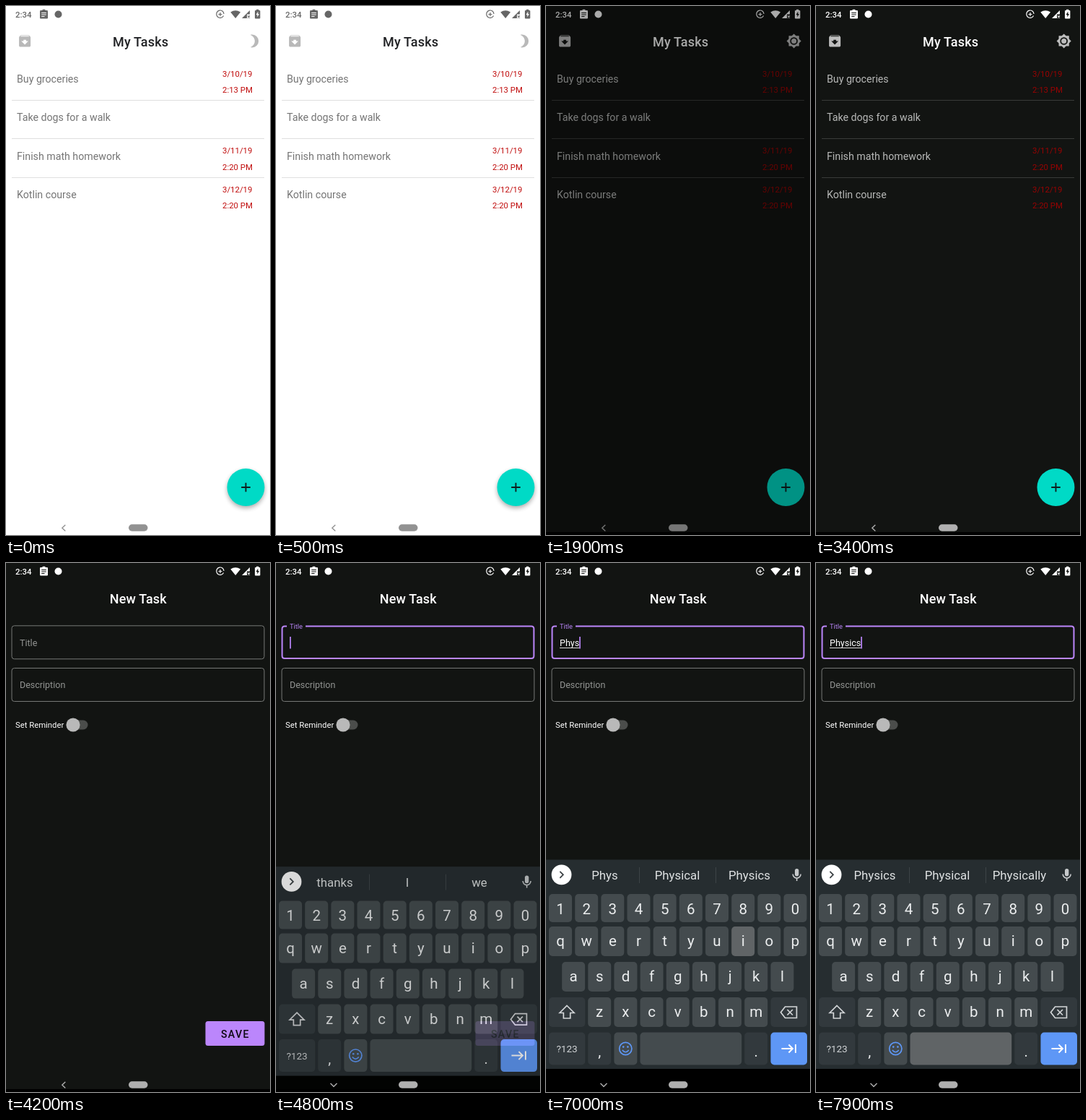
An HTML page that plays this animation: 366 px wide and 732 px high, repeating every 8000 ms.

```html
<!DOCTYPE html>
<html lang="en">
<head>
<meta charset="utf-8">
<title>My Tasks</title>
<style>
html, body { margin: 0; width: 100%; height: 100%; overflow: hidden; background: #000; }
svg { display: block; width: 366px; height: 732px; font-family: Roboto, "Noto Sans", sans-serif; }
.light { --bg: #fff; --bar: #666; --title: #202124; --icon: #b9b9b9; --text: #757575; --date: #c00c0c; --line: #dfdfdf; --nav: #929292; --edge: #fff; }
.dark { --bg: #121412; --bar: #fff; --title: #fff; --icon: #bdbdbd; --text: #b8b9b8; --date: #980303; --line: #393b39; --nav: #b0b0b0; --edge: #000; }
.bg { fill: var(--bg); }
.bar { fill: var(--bar); }
.bar-line { fill: none; stroke: var(--bar); stroke-width: 1.2; }
.bg-line { fill: none; stroke: var(--bg); stroke-width: 1.2; }
.icon { fill: var(--icon); }
.title { fill: var(--title); font-size: 18px; font-weight: 500; letter-spacing: .2px; text-anchor: middle; }
.task { fill: var(--text); font-size: 14.2px; }
.date { fill: var(--date); font-size: 11.4px; }
.rule { stroke: var(--line); }
.light .sun, .dark .moon, .dark .shadow { display: none; }
.hint { fill: #929492; font-size: 12.5px; }
.key { fill: #444b4e; }
.key.fn { fill: #32393d; }
.key.enter { fill: #5e97f6; }
.key.down { fill: #606466; }
.cap { fill: #eceeef; font-size: 20.5px; text-anchor: middle; }
.word { fill: #dfe2e3; font-size: 16.8px; text-anchor: middle; }
.stroke { fill: none; stroke: #d3d6d8; stroke-width: 1.7; }
</style>
</head>
<body>
<svg id="stage" class="light" viewBox="0 0 366 732"></svg>
<script>
const LOOP = 8000, STEP = 100;
const stage = document.getElementById('stage');

const text = (x, y, s, cls, extra = '') => `<text x="${x}" y="${y}" class="${cls}" ${extra}>${s}</text>`;
const rect = (x, y, w, h, r, extra) => `<rect x="${x}" y="${y}" width="${w}" height="${h}" rx="${r}" ${extra}/>`;
const path = (d, extra) => `<path d="${d}" ${extra}/>`;
const circle = (x, y, r, extra) => `<circle cx="${x}" cy="${y}" r="${r}" ${extra}/>`;

function statusBar() {
  return text(13, 16, '2:34', 'bar', 'font-size="11.4" font-weight="500"') +
    rect(47, 6, 11, 11.5, 1.2, 'class="bar"') +
    rect(50.3, 4.8, 4.4, 3, 1.2, 'class="bar"') +
    path('M49.2 9.5H55.8M49.2 12H55.8M49.2 14.5H53.5', 'class="bg-line"') +
    circle(72.5, 11.5, 5, 'class="bar"') +
    path('M300 7A5.2 5.2 0 1 0 301.6 13.6M300 7A5.2 5.2 0 0 1 302 11', 'class="bar-line"') +
    path('M297 9V14M294.5 11.5H299.5', 'class="bar-line"') +
    path('M318.2 17L311.3 8.4Q318.2 3.9 325.1 8.4Z', 'class="bar"') +
    path('M338 6V11.5H334V17H327Z', 'class="bar"') +
    path('M335 13.5L338 16.5M338 13.5L335 16.5', 'class="bar-line"') +
    rect(345, 6, 7.4, 11.4, 1, 'class="bar"') +
    rect(347, 4.8, 3.4, 2, .3, 'class="bar"') +
    path('M349.4 7.6L346.6 12.2H348.4V15.6L351 10.9H349.4Z', 'class="bg"');
}

function listPage() {
  const tasks = [
    ['Buy groceries', '3/10/19', '2:13 PM'],
    ['Take dogs for a walk'],
    ['Finish math homework', '3/11/19', '2:20 PM'],
    ['Kotlin course', '3/12/19', '2:20 PM']
  ];
  const rows = tasks.map(([name, day, hour], i) => {
    const y = i * 53.3;
    return text(15, 106 + y, name, 'task') +
      (day ? text(300, 97.7 + y, day, 'date') + text(300, 120 + y, hour, 'date') : '') +
      (i < 3 ? path(`M8 ${Math.round(130 + y) + .5}H358`, 'class="rule"') : '');
  }).join('');
  const at = x => `transform="translate(${x} 37.8) scale(.89)" fill-rule="evenodd"`;
  return rect(0, 0, 366, 732, 0, 'class="bg"') +
    path('M20.54 5.23l-1.39-1.68C18.88 3.21 18.47 3 18 3H6c-.47 0-.88.21-1.16.55L3.46 5.23C3.17 5.57 3 6.02 3 6.5V19c0 1.1.9 2 2 2h14c1.1 0 2-.9 2-2V6.5c0-.48-.17-.93-.46-1.27zM12 17.5L6.5 12H10v-2h4v2h3.5zM5.12 5l.81-1h12l.94 1z', `class="icon" ${at(15.4)}`) +
    path('M9 2c-1.05 0-2.05.16-3 .46 4.06 1.27 7 5.06 7 9.54s-2.94 8.27-7 9.54c.95.3 1.95.46 3 .46a10 10 0 0 0 0-20z', `class="icon moon" ${at(333.3)}`) +
    path('M20 8.69V4h-4.69L12 .69 8.69 4H4v4.69L.69 12 4 15.31V20h4.69L12 23.31 15.31 20H20v-4.69L23.31 12zM12 18a6 6 0 1 1 0-12 6 6 0 0 1 0 12zm0-10a4 4 0 1 0 0 8 4 4 0 0 0 0-8z', `class="icon sun" ${at(333)}`) +
    text(186.7, 56, 'My Tasks', 'title') + rows +
    circle(332.5, 669, 26, 'class="shadow" fill="#000" opacity=".32" filter="url(#blur)"') +
    circle(332.5, 666, 26, 'fill="#00dac6"') +
    path('M332.5 659.7V672.3M326.2 666H338.8', 'stroke="#10201e" stroke-width="1.9"');
}

function formPage() {
  const box = y => rect(8, y, 350, 46, 3.5, 'fill="none" stroke="#767876"');
  return rect(0, 0, 366, 732, 0, 'class="bg"') +
    text(183.3, 56, 'New Task', 'title') +
    `<g id="idle">${box(86.8)}</g>` + box(145.5) +
    path('M41 87.5H354Q357.5 87.5 357.5 91V128.5Q357.5 132 354 132H12Q8.5 132 8.5 128.5V91Q8.5 87.5 12 87.5H15', 'id="focus" fill="none" stroke="#bb86fc" stroke-width="2"') +
    text(19, 114.5, 'Title', 'hint', 'id="label"') +
    text(19, 173, 'Description', 'hint') +
    text(19, 115, '', '', 'id="typed" fill="#fff" font-size="12.5"') +
    path('', 'id="under" stroke="#ddd" stroke-width="1"') +
    rect(19, 102, 1.7, 16.5, 0, 'id="caret" fill="#bb86fc"') +
    text(13, 228.3, 'Set Reminder', '', 'fill="#fff" font-size="11.3"') +
    rect(85, 217.5, 28.5, 13, 6.5, 'fill="#4b4d4b"') +
    circle(93, 224, 9.6, 'fill="#b9b9b9"') +
    rect(276.5, 634, 82, 34, 3.5, 'fill="#bb86fc"') +
    text(298, 656.5, 'SAVE', '', 'fill="#0c0812" font-size="14.2" font-weight="500" letter-spacing="1.3"');
}

function keyboard() {
  const key = (id, x, y, w, h, cls = '') => rect(x, y, w, h, 5, `class="key ${cls}" data-key="${id}"`);
  const rows = [['1234567890', 4, 458, 39, 485.5], ['qwertyuiop', 4, 503, 41, 530], ['asdfghjkl', 22.1, 552, 41, 579], ['zxcvbnm', 58.2, 601, 41, 628]];
  let out = rect(0, 410.5, 366, 291, 0, 'fill="#262d30"') + rect(0, 700, 366, 120, 0, 'fill="#000"');
  for (const [chars, x0, y, h, base] of rows)
    [...chars].forEach((c, i) => {
      const x = x0 + i * 36.17;
      out += key(c, x, y, 32, h) + text(x + 16, base, c, 'cap');
    });
  out += key('shift', 4, 601, 50.3, 41, 'fn') + key('back', 311.5, 601, 50.5, 41, 'fn') +
    key('sym', 4, 649.5, 50.3, 45, 'fn') + key('comma', 58.2, 649.5, 32, 45, 'fn') +
    key('emoji', 94.4, 649.5, 32, 45) + key('space', 130.5, 649.5, 140.7, 45) +
    key('dot', 275.2, 649.5, 32, 45, 'fn') + key('enter', 311.5, 649.5, 50.5, 45, 'enter');
  out += path('M29 612.5L39 622.5H33.7V630H24.3V622.5H19Z', 'id="shift" class="stroke"') +
    path('M331.5 614H347.5V629.5H331.5L325.5 621.8ZM334.5 618L342 625.5M342 618L334.5 625.5', 'class="stroke"') +
    text(29, 677, '?123', '', 'fill="#d3d6d8" font-size="13.5" text-anchor="middle"') +
    text(74.2, 683, ',', 'cap') + text(291.2, 683, '.', 'cap') +
    circle(110.3, 672, 8.6, 'fill="none" stroke="#5e97f6" stroke-width="1.7"') +
    circle(107.2, 669.6, 1.3, 'fill="#5e97f6"') + circle(113.4, 669.6, 1.3, 'fill="#5e97f6"') +
    path('M105.8 674Q110.3 679.5 114.8 674', 'fill="none" stroke="#5e97f6" stroke-width="1.6"') +
    path('M326.5 672H342M336.5 666.5L342 672L336.5 677.5M346 666V678', 'fill="none" stroke="#fff" stroke-width="2"');
  out += circle(21.5, 431.3, 13.9, 'fill="#fff"') +
    path('M19.3 426.8L23.8 431.3L19.3 435.8', 'fill="none" stroke="#3c4245" stroke-width="1.8"') +
    path('M129.5 421V443M235.5 421V443', 'stroke="#3d4447"') +
    [81.5, 182, 282].map(x => text(x, 438, '', 'word')).join('') +
    rect(345, 423, 5.4, 10.5, 2.7, 'fill="#c6c9cb"') +
    path('M342.2 430.5A5.5 5.5 0 0 0 353.2 430.5M347.7 436V440', 'fill="none" stroke="#c6c9cb" stroke-width="1.6"');
  return `<g id="keys">${out}</g>`;
}

stage.innerHTML = '<defs><filter id="blur" x="-30%" y="-30%" width="160%" height="160%"><feGaussianBlur stdDeviation="3"/></filter></defs>' +
  `<g id="list">${listPage()}</g><g id="form">${formPage()}</g>${statusBar()}` +
  rect(0, 728, 366, 4, 0, 'style="fill:var(--edge)"') + keyboard() +
  path('', 'id="chevron" fill="none" style="stroke:var(--nav)" stroke-width="1.4"') +
  rect(170, 717.3, 26.5, 9.4, 4.7, 'style="fill:var(--nav)"') +
  rect(0, 0, 366, 732, 0, 'id="cover"');

const el = id => document.getElementById(id);
const ui = Object.fromEntries(['list', 'form', 'idle', 'focus', 'label', 'typed', 'under', 'caret', 'keys', 'shift', 'chevron', 'cover'].map(id => [id, el(id)]));
const keyEls = [...stage.querySelectorAll('.key')];
const caps = [...stage.querySelectorAll('.cap')];
const words = [...stage.querySelectorAll('.word')];
const set = (node, attrs) => { for (const k in attrs) node.setAttribute(k, attrs[k]); };

// time of press, key
const presses = [[5300, 'shift'], [5800, 'p'], [6200, 'h'], [6500, 'y'], [6800, 's'], [7000, 'i'], [7200, 'c'], [7500, 's'], [7900, 'space']];
// time, typed text, suggestions
const typing = [
  [0, '', 'thanks', 'I', 'we'],
  [5900, 'P', 'P', 'Please', 'Probably'],
  [6300, 'Ph', 'Ph', 'Phone', 'Photo'],
  [6600, 'Phy', 'Phy', 'Physical', 'Physics'],
  [6900, 'Phys', 'Phys', 'Physical', 'Physics'],
  [7100, 'Physi', 'Physical', 'Physics', 'Physically'],
  [7300, 'Physic', 'Physics', 'Physical', 'Physically'],
  [7600, 'Physics', 'Physics', 'Physical', 'Physically']
];
const ramp = (t, from, to) => Math.min(1, Math.max(0, (t - from) / (to - from)));
const mix = (a, b, p) => a + (b - a) * p;

function draw(t) {
  stage.setAttribute('class', t < 1600 ? 'light' : 'dark');
  set(ui.cover, { opacity: t < 1600 ? 0 : 1 - ramp(t, 1700, 2000) });
  set(ui.form, { opacity: ramp(t, 3500, 3900) });

  const p = ramp(t, 4300, 4600);
  set(ui.focus, { opacity: p });
  set(ui.idle, { opacity: 1 - p });
  set(ui.label, { y: mix(114.5, 91, p) });
  ui.label.style.fontSize = mix(12.5, 9.3, p) + 'px';
  ui.label.style.fill = p > 0 ? '#b582f3' : '';

  const rest = (1 - ramp(t, 4500, 5000)) ** 2;
  set(ui.keys, { transform: `translate(0 ${60 * rest})`, opacity: 1 - rest });
  set(ui.chevron, { d: t < 4700 ? 'M82.3 718L77.8 722.3L82.3 726.6' : 'M75.5 720L80 724.4L84.5 720' });

  const [since, typed, ...tips] = typing.filter(s => s[0] <= t).pop();
  ui.typed.textContent = typed;
  const width = typed ? ui.typed.getComputedTextLength() : 0;
  set(ui.under, { d: typed ? `M19 117.5H${19 + width}` : '' });
  const blink = (t - (since || 4600)) % 1000 < 500;
  set(ui.caret, { x: 19 + width, opacity: t >= 4600 && blink ? 1 : 0 });
  words.forEach((w, i) => { w.textContent = tips[i]; });

  const upper = t >= 5400 && t < 5900;
  caps.forEach(c => {
    const s = c.textContent;
    c.textContent = upper ? s.toUpperCase() : s.toLowerCase();
  });
  ui.shift.style.fill = upper ? '#d3d6d8' : 'none';
  const down = presses.find(([at]) => t >= at && t < at + 100);
  keyEls.forEach(k => k.classList.toggle('down', !!down && k.dataset.key === down[1]));
}

const start = performance.now();
let last = -1;
function tick() {
  const t = Math.floor((performance.now() - start) % LOOP / STEP) * STEP;
  if (t !== last) draw(last = t);
  requestAnimationFrame(tick);
}
tick();
</script>
</body>
</html>
```
